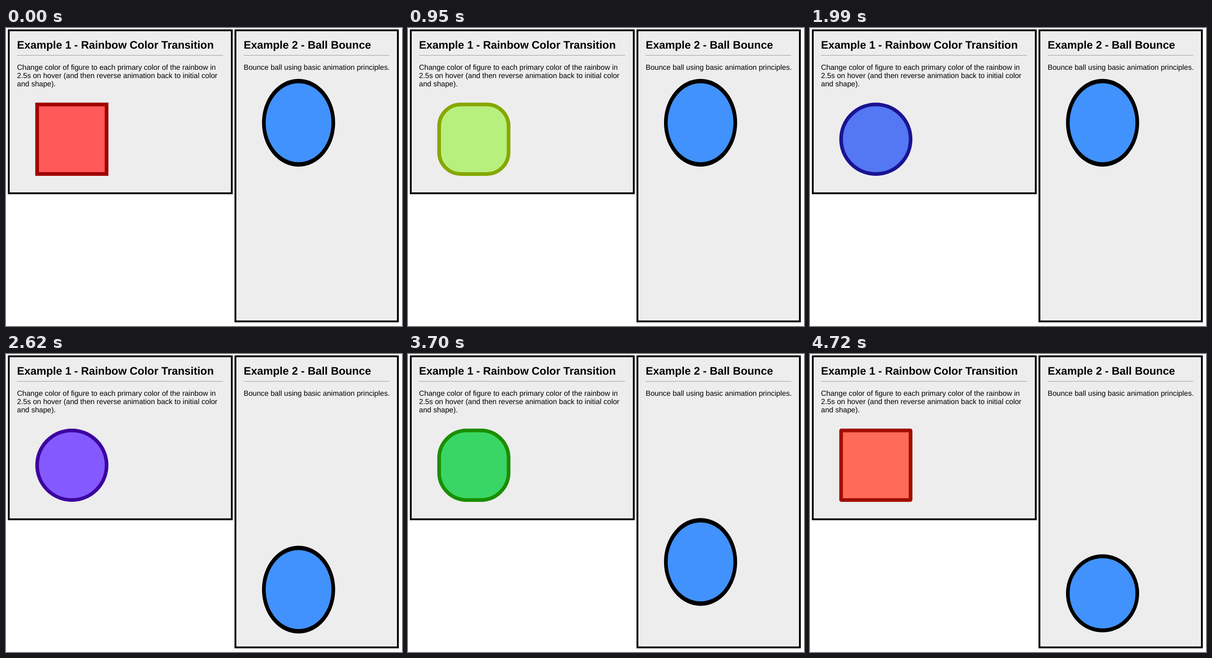
These frames come from a looping animation (863 px wide and 649 px high, 4820 ms). An HTML page:

```html
<!DOCTYPE html>
<html lang="en">
<head>
<meta charset="utf-8">
<title>Animation examples</title>
<style>
  html, body { margin: 0; width: 100%; height: 100%; overflow: hidden; background: #fff; }
  svg { display: block; font: 16px "Liberation Sans", Arial, sans-serif; text-rendering: geometricPrecision; }
  .panel { fill: #ededed; stroke: #000; stroke-width: 4; }
  .rule { fill: #9a9a9a; }
  .title { font-size: 23.9px; font-weight: bold; }
  #figure { stroke-width: 8; }
  #ball { fill: #4192fd; stroke: #000; stroke-width: 8; }
</style>
</head>
<body>
<svg width="863" height="649" viewBox="0 0 863 649">
  <rect class="panel" x="6" y="5" width="486" height="355"/>
  <text class="title" x="24" y="45">Example 1 - Rainbow Color Transition</text>
  <rect class="rule" x="24" y="59" width="449" height="1"/>
  <text x="24" y="91">Change color of figure to each primary color of the rainbow in</text>
  <text x="24" y="109">2.5s on hover (and then reverse animation back to initial color</text>
  <text x="24" y="127">and shape).</text>
  <rect id="figure" x="67.8" y="166.5" width="151.4" height="151.4"/>

  <rect class="panel" x="500" y="5" width="354" height="634"/>
  <text class="title" x="518" y="45">Example 2 - Ball Bounce</text>
  <rect class="rule" x="518" y="59" width="317" height="1"/>
  <text x="518" y="91">Bounce ball using basic animation principles.</text>
  <ellipse id="ball" rx="75.7" ry="75.7"/>
</svg>
<script>
const LOOP = 4820;
const TURN = 2457;      // the rainbow runs backwards from here
const BOUNCE = 1056;
const DROP = 315;

// evenly spaced, from red to violet
const fills = ["#ff5959", "#ff7f55", "#f8fd8a", "#32d464", "#32acaa", "#5a6eff", "#a04bff"].map(rgb);
const borders = ["#a00000", "#a02000", "#beb400", "#148c00", "#004c3c", "#1e0aa0", "#5000a0"].map(rgb);

const figure = document.getElementById("figure");
const ball = document.getElementById("ball");

function rgb(hex) {
  return [1, 3, 5].map(i => parseInt(hex.slice(i, i + 2), 16));
}

function blend(colors, p) {
  const x = p * (colors.length - 1);
  const i = Math.min(Math.floor(x), colors.length - 2);
  const channels = colors[i].map((v, c) => Math.round(v + (colors[i + 1][c] - v) * (x - i)));
  return `rgb(${channels})`;
}

function drawFigure(t) {
  const p = 1 - Math.abs(1 - t / TURN);
  const radius = 80 * (1 - (1 - p) ** 3.3) ** 2;
  figure.setAttribute("rx", Math.max(0, radius - 4));
  figure.setAttribute("fill", blend(fills, p));
  figure.setAttribute("stroke", blend(borders, p));
}

// fall, squash on the floor, rise, rest at the top
function drawBall(t) {
  const p = t % BOUNCE;
  const land = 410, leave = 506, top = 960;
  let drop = 0, stretch = 1.2;
  if (p < land) {
    drop = (p / land) ** 4;
  } else if (p < leave) {
    drop = 1;
    stretch -= 0.46 * Math.sin(Math.PI * (p - land) / (leave - land));
  } else if (p < top) {
    drop = ((top - p) / (top - leave)) ** 4;
  }
  ball.setAttribute("transform", `translate(637.6 ${206.3 + DROP * drop}) scale(1 ${stretch})`);
}

const start = performance.now();
function draw() {
  const t = (performance.now() - start) % LOOP;
  drawFigure(t);
  drawBall(t);
  requestAnimationFrame(draw);
}
draw();
</script>
</body>
</html>
```
